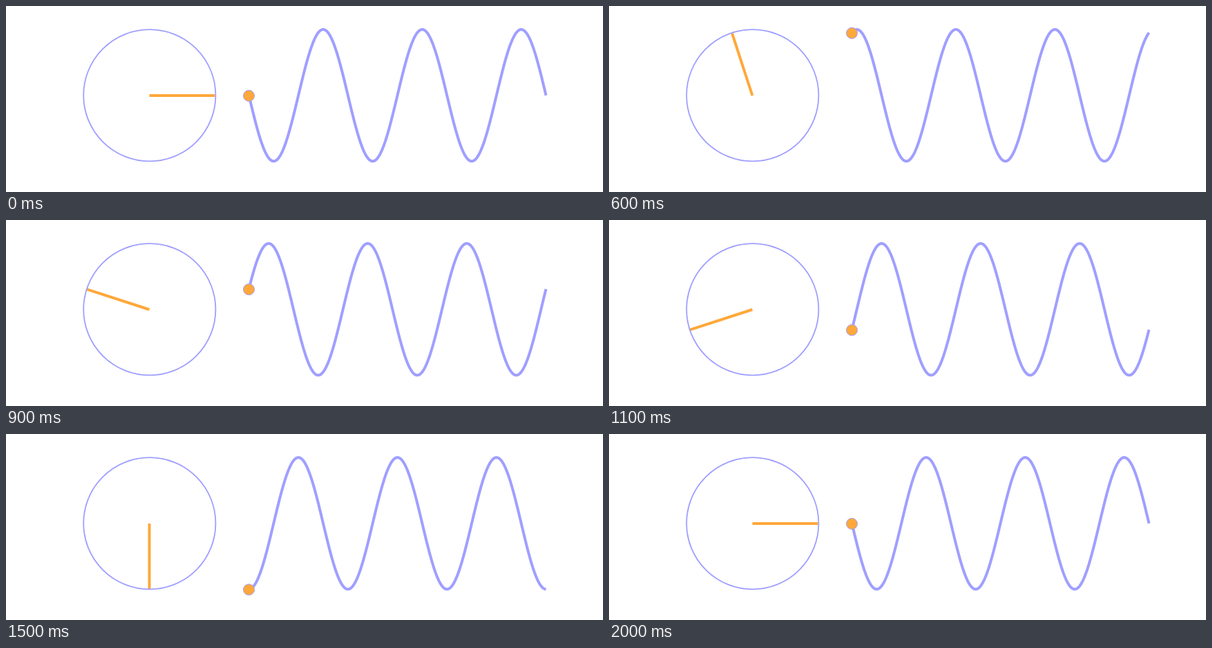
Recreate the animation shown at these times as an HTML page. Size 864 by 270 pixels, loop 2.1 s.

```html
<!DOCTYPE html>
<html lang="en">
<head>
<meta charset="utf-8">
<title>Sine wave from a rotating radius</title>
<style>
  html, body { margin: 0; width: 100%; height: 100%; overflow: hidden; background: #fff; }
  svg { display: block; width: 864px; height: 270px; }
  .line { fill: none; stroke: #a09fff; }
  #spoke { stroke: #ffa83a; stroke-width: 4; }
  #dot { fill: #ffa83a; stroke: #a09fff; stroke-width: 1; }
</style>
</head>
<body>
<svg viewBox="0 0 864 270">
  <line id="spoke" x1="207.5" y1="130" x2="303" y2="130"/>
  <circle class="line" cx="207.8" cy="129.7" r="95.6" stroke-width="1.8"/>
  <path id="wave" class="line" stroke-width="4" stroke-linejoin="round"/>
  <circle id="dot" cx="351.5" cy="130.3" r="8"/>
</svg>
<script>
  const STEP = 100, STEPS = 21, TURN = 20;
  const CENTER = 129.7, RADIUS = 95.6;
  const START = 351.5, END = 781.5, PERIOD = (END - START) / 3;
  const [spoke, wave, dot] = ['spoke', 'wave', 'dot'].map(id => document.getElementById(id));

  const height = angle => CENTER - RADIUS * Math.sin(angle);

  function draw(step) {
    const angle = 2 * Math.PI * step / TURN;
    spoke.setAttribute('x2', 207.5 + 95 * Math.cos(angle));
    spoke.setAttribute('y2', 130 - 95 * Math.sin(angle));
    dot.setAttribute('cy', height(angle) + 0.6);
    const points = [];
    for (let x = START; x <= END; x += 1) {
      const y = height(angle - 2 * Math.PI * (x - START) / PERIOD);
      points.push(x + ' ' + y.toFixed(2));
    }
    wave.setAttribute('d', 'M' + points.join('L'));
  }

  // The last step completes the turn, so the loop rests there for two steps.
  let shown = -1;
  function tick() {
    const step = Math.floor(performance.now() / STEP) % STEPS;
    if (step !== shown) draw(shown = step);
    requestAnimationFrame(tick);
  }
  tick();
</script>
</body>
</html>
```
